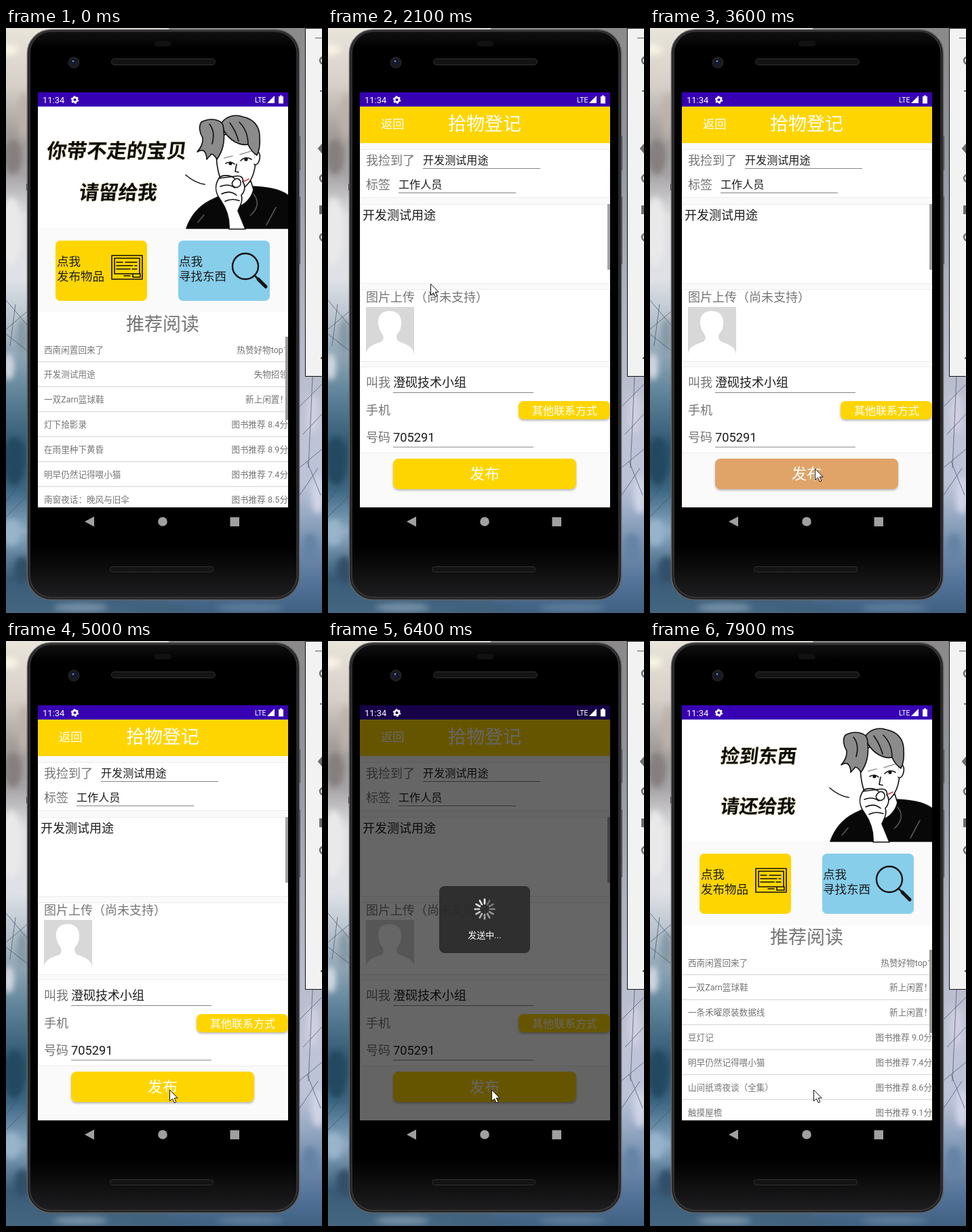
These frames come from a looping animation (466 by 864 pixels, 8 s). An HTML page:

```html
<!DOCTYPE html>
<html lang="zh-CN">
<head>
<meta charset="utf-8">
<style>
html, body { margin: 0; width: 100%; height: 100%; overflow: hidden; background: #111; }
svg { display: block; width: 466px; height: 864px; }
text { font-family: Roboto, "Noto Sans CJK SC", "Noto Sans CJK", sans-serif; white-space: pre; }
.brush { font-family: "Noto Sans CJK SC", "Noto Sans CJK", serif; font-weight: 500; }
.ink { font-weight: 900; stroke: #f0e8c4; stroke-width: 1.6px; paint-order: stroke; }
.line { fill: none; stroke: #101010; stroke-width: 1.6; stroke-linecap: round; stroke-linejoin: round; }
</style>
</head>
<body>
<svg viewBox="0 0 466 864">
  <defs>
    <linearGradient id="wallLeft" x2="0" y2="1">
      <stop offset="0" stop-color="#e9e4da"/><stop offset=".1" stop-color="#d6cfc8"/>
      <stop offset=".18" stop-color="#a39d9b"/><stop offset=".25" stop-color="#a6a3a6"/>
      <stop offset=".32" stop-color="#dedee0"/><stop offset=".43" stop-color="#dfe1e6"/>
      <stop offset=".52" stop-color="#a9b8c4"/><stop offset=".62" stop-color="#62869c"/>
      <stop offset=".72" stop-color="#2d5670"/><stop offset=".79" stop-color="#3d6884"/>
      <stop offset=".86" stop-color="#8ba9c2"/><stop offset=".94" stop-color="#3a5c78"/>
      <stop offset="1" stop-color="#456681"/>
    </linearGradient>
    <linearGradient id="wallRight" x2="0" y2="1">
      <stop offset="0" stop-color="#8b898a"/><stop offset=".2" stop-color="#91959c"/>
      <stop offset=".45" stop-color="#aeb3c0"/><stop offset=".68" stop-color="#bfc3d6"/>
      <stop offset=".78" stop-color="#bcc3d8"/><stop offset=".86" stop-color="#849bb8"/>
      <stop offset=".95" stop-color="#527298"/><stop offset="1" stop-color="#3f6080"/>
    </linearGradient>
    <linearGradient id="bezel" x2="0" y2="1">
      <stop offset="0" stop-color="#111"/><stop offset=".03" stop-color="#000"/>
      <stop offset=".91" stop-color="#000"/><stop offset="1" stop-color="#1e1e20"/>
    </linearGradient>
    <filter id="soft"><feGaussianBlur stdDeviation="4"/></filter>
    <filter id="shadow" x="-10%" y="-10%" width="120%" height="140%">
      <feDropShadow dx="0" dy="2" stdDeviation="1.5" flood-color="#666" flood-opacity=".45"/>
    </filter>
    <clipPath id="screenClip"><rect x="47" y="95" width="369" height="613"/></clipPath>
  </defs>

  <g id="wall"></g>
  <g id="phone"></g>
  <g clip-path="url(#screenClip)">
    <rect x="47" y="95" width="369" height="613" fill="#fafafa"/>
    <g id="home"></g>
    <g id="form"></g>
    <rect x="47" y="95" width="369" height="21" fill="#3700b3"/>
    <rect id="dim" x="47" y="95" width="369" height="613"/>
    <g id="status"></g>
    <g id="dialog"></g>
  </g>
  <path id="cursor" d="M0 0V16.5L4 13L6.8 19L9.4 17.8L6.7 12H11.7Z" fill="#fff" stroke="#111" stroke-width="1"/>
</svg>

<script>
const $ = id => document.getElementById(id);
const MUTED = '#757575', DARK = '#1c1c1c', YELLOW = '#ffd500', PRESSED = '#e0a468';

const rect = (x, y, w, h, fill, more = '') =>
  `<rect x="${x}" y="${y}" width="${w}" height="${h}" fill="${fill}" ${more}/>`;
const path = (d, fill = 'none', more = '') => `<path d="${d}" fill="${fill}" ${more}/>`;
const label = (x, y, size, fill, text, more = '') =>
  `<text x="${x}" y="${y}" font-size="${size}" fill="${fill}" ${more}>${text}</text>`;
const brush = (x, y, size, fill, text) => label(x, y, size, fill, text, 'class="brush"');
const ink = (x, y, size, text) =>
  `<g transform="translate(${x} ${y}) skewX(-7)">${label(0, 0, size, '#0c0c0c', text, 'class="brush ink"')}</g>`;
const range = (n, draw) => Array.from({ length: n }, (_, i) => draw(i)).join('');

function drawWall() {
  const blobs = [
    [4, 32, 14, 8, '#f8f3e4'], [26, 130, 8, 36, '#bdb2aa'], [10, 190, 14, 26, '#85807f'],
    [8, 300, 16, 50, '#e9e9ea'], [24, 455, 8, 26, '#8398a4'], [4, 500, 8, 20, '#d2d9e0'],
    [12, 640, 16, 36, '#23495f'], [8, 745, 14, 20, '#98b4cb'], [24, 800, 12, 20, '#304f69'],
    [452, 570, 10, 30, '#cfcfe0'], [460, 690, 10, 28, '#d0d4e6'], [448, 770, 12, 24, '#6583a6'],
    [110, 856, 40, 6, '#7893a8'], [230, 858, 50, 6, '#41617c'], [360, 856, 50, 6, '#5d7c9a']
  ].map(([x, y, rx, ry, c]) => `<ellipse cx="${x}" cy="${y}" rx="${rx}" ry="${ry}" fill="${c}"/>`).join('');
  const twigs = 'M0 402L32 440M0 445L32 418M0 452L32 477M14 408L6 470M0 700L32 655M0 722L32 690' +
    'M432 560L466 526M438 600L466 570M452 515L446 650M432 650L466 622M444 640L464 690M433 690L460 650';
  $('wall').innerHTML = rect(0, 0, 240, 864, 'url(#wallLeft)') + rect(240, 0, 226, 864, 'url(#wallRight)') +
    `<g filter="url(#soft)">${blobs}</g>` + path(twigs, 'none', 'stroke="#465366" stroke-width="1" opacity=".7"') +
    rect(441.5, .5, 30, 514, '#f2f2f2', 'stroke="#111"') +
    rect(456, 14, 10, 1.5, '#888') +
    [48, 222, 309].map(y => `<circle cx="468" cy="${y}" r="5" fill="none" stroke="#6e6e6e" stroke-width="2.5"/>`).join('') +
    path('M463 93H466M461 178L466 172V184Z', '#6e6e6e', 'stroke="#6e6e6e" stroke-width="2"') +
    rect(462, 262, 5, 13, '#6e6e6e') + rect(464, 486, 2, 3, '#6e6e6e');
}

function drawPhone() {
  const grille = (x, y, w, h) => rect(x, y, w, h, '#141415', `rx="${h / 2}" stroke="#303032"`);
  $('phone').innerHTML =
    rect(429, 160, 5, 50, '#39393b') + rect(429, 249, 5, 100, '#39393b') + rect(30, 230, 4, 10, '#39393b') +
    rect(31.5, 2.5, 401, 842, '#202022', 'rx="35" stroke="#626264" stroke-width="1.5"') +
    rect(35, 5, 394, 836, 'url(#bezel)', 'rx="32" stroke="#3a3a3c" stroke-width="1.5"') +
    rect(219, 19, 25, 8, '#111', 'rx="4"') + grille(155.5, 45.5, 153, 9) + grille(153.5, 795.5, 152, 8) +
    '<circle cx="100" cy="51" r="8" fill="#1b1b1f" stroke="#2b2b2f"/><circle cx="100" cy="50" r="4" fill="#101a36"/><circle cx="99" cy="49" r="1.3" fill="#8990a8"/>' +
    path('M116 729L130 721.5V736.5Z', '#a0a0a0') + '<circle cx="231" cy="729" r="6.8" fill="#a0a0a0"/>' +
    rect(330.5, 722.5, 13.5, 13.5, '#a0a0a0');
}

function portrait() {
  return `<g class="line">` +
    path('M266 296C273 276 285 262 305 253L328 242L363 234C382 235 404 237 417 248V296Z', '#080808') +
    path('M322 248L336 243L361 226L365 239C361 254 350 262 343 263Z', '#fff') +
    path('M312 164C309 184 309 202 316 222C322 235 334 241 344 240C357 234 366 220 368 199L366 164L340 147Z', '#fff') +
    path('M367 183C374 180 376 188 373 197C371 202 368 203 366 201', '#fff') +
    path('M321 151C323 168 319 183 311 194C309 190 306 187 303 186C301 189 298 191 296 194C296 188 294 183 291 181C288 180 285 181 282 183C288 176 291 169 290 162C285 154 284 145 288 139C299 133 311 134 318 140C325 130 338 127 349 131C364 134 373 144 374 158C375 171 374 181 370 188C364 184 360 179 357 172C345 174 330 167 321 151Z', '#8b8b8b') +
    path('M318 140C321 144 321 147 321 151M344 139C352 147 357 157 357 172M300 142C306 149 307 160 304 171M330 140C336 148 340 156 343 167') +
    path('M322 192L334 189M345 187L361 182', 'none', 'style="stroke:#999"') +
    path('M324 200C329 197 334 198 337 201M346 196C351 191 357 191 362 194M340 201L338 212L343 213') +
    '<circle cx="331" cy="200" r="1.8" fill="#101010"/><circle cx="354" cy="194" r="1.8" fill="#101010"/>' +
    path('M346 229L358 223', 'none', 'style="stroke:#c8404c"') +
    path('M329 297C330 280 325 267 317 255C308 243 307 233 314 222L337 219C346 217 351 221 349 227C354 233 352 242 347 247C350 257 344 264 342 270L353 297Z', '#fff') +
    path('M314 222C318 216 331 217 337 222M335 226C341 218 349 225 345 233C338 239 330 232 335 226ZM316 234C324 231 332 232 337 236M318 245C326 241 334 242 340 247M323 256C331 252 338 253 344 255') +
    path('M265 217C273 224 281 229 293 231') +
    path('M365 245C374 256 371 268 360 277M384 291L398 265M283 287L292 276', 'none', 'style="stroke:#555"') + '</g>';
}

function drawHome() {
  const board = `<g class="line">` +
    path('M156 336H201V371H156ZM160 340H197V363H160ZM163 346H172M176 346H193M163 351H187M190 351H193M163 356H183M186 356H193M174 366H183M187 363H198V368H187Z') + '</g>';
  const lens = '<circle cx="353" cy="352" r="19" fill="none" stroke="#111" stroke-width="2.4"/>' +
    path('M367 366L372 371', 'none', 'stroke="#111" stroke-width="2.5"') +
    path('M372 371L383 382', 'none', 'stroke="#111" stroke-width="5" stroke-linecap="round"');
  $('home').innerHTML = rect(47, 116, 369, 179, '#fff') + portrait() +
    `<g id="bannerA">${ink(59, 192, 29.5, '你带不走的宝贝') + ink(107, 253, 28.7, '请留给我')}</g>` +
    `<g id="bannerB">${ink(103, 180, 28, '捡到东西') + ink(103, 254, 27.7, '请还给我')}</g>` +
    rect(73, 314, 135, 89, YELLOW, 'id="postButton" rx="7"') + rect(254, 314, 135, 89, '#87ceeb', 'rx="7"') +
    board + lens +
    brush(75, 351, 17.5, DARK, '点我') + brush(75, 373, 17.5, DARK, '发布物品') +
    brush(255, 351, 17.5, DARK, '点我') + brush(255, 373, 17.5, DARK, '寻找东西') +
    rect(47, 420, 369, 288, '#fff') + brush(177, 447, 27, MUTED, '推荐阅读') +
    `<g id="listA">${list(listA)}</g><g id="listB">${list(listB)}</g>` +
    rect(412, 456, 4, 123, '#999');
}

const book = score => `图书推荐 ${score}分`;
const calmBook = ['明早仍然记得喂小猫', book('7.4')];
const shoes = ['一双Zarn篮球鞋', '新上闲置！'];
const news = ['西南闲置回来了', '热赞好物top1'];
const listA = [news, ['开发测试用途', '失物招领'], shoes, ['灯下拾影录', book('8.4')],
  ['在雨里种下黄昏', book('8.9')], calmBook, ['南窗夜话：晚风与旧伞', book('8.5')]];
const listB = [news, shoes, ['一条禾曜原装数据线', '新上闲置！'], ['豆灯记', book('9.0')],
  calmBook, ['山间纸鸢夜谈（全集）', book('8.6')], ['触摸屋檐', book('9.1')]];

function list(rows) {
  return rows.map(([title, note], i) => {
    const y = 479.5 + 36.9 * i;
    return label(56, y, 12.6, MUTED, title) + label(416, y, 12.6, MUTED, note, 'text-anchor="end"') +
      rect(47, y + 12.5, 369, 1.5, '#dedede');
  }).join('');
}

function drawForm() {
  const card = (y, h) => rect(47.5, y + .5, 368, h, '#fff', 'stroke="#ececec"');
  const underline = (x, y, w) => rect(x, y, w, 1, '#858585');
  $('form').innerHTML = rect(47, 116, 369, 592, '#fafafa') + rect(47, 116, 369, 54, YELLOW) +
    brush(78, 148, 17.3, '#fff', '返回') + brush(177, 151, 27, '#fff', '拾物登记') +
    card(179, 71) + card(260, 117) + card(386, 106) + card(500, 127) +
    label(56, 202, 18, MUTED, '我捡到了') + label(140, 201, 16.1, DARK, '开发测试用途') + underline(140, 207, 173) +
    label(56, 238, 18, MUTED, '标签') + label(104, 237, 16.1, DARK, '工作人员') + underline(104, 243, 173) +
    label(51, 283, 18, DARK, '开发测试用途') + rect(412, 260, 4, 97, '#a3a3a3') +
    label(56, 404, 18, MUTED, '图片上传（尚未支持）') +
    rect(56, 412, 71, 72, '#d8d8d8') +
    path('M56 484C56 470 67 468 79 463C83 460 82 455 80 452C76 447 75 442 74 437C73 424 80 418 91 418C102 418 109 425 108 437C108 443 106 448 102 452C100 456 101 461 105 463C116 468 127 470 127 484Z', '#fff') +
    label(56, 530, 18, MUTED, '叫我') + label(96, 530, 18, DARK, '澄砚技术小组') + underline(96, 538, 207) +
    label(56, 571, 18, MUTED, '手机') + label(56, 611, 18, MUTED, '号码') +
    label(96, 611, 18.3, DARK, '705291') + underline(96, 618.5, 207) +
    rect(281, 551, 135, 27, YELLOW, 'rx="7" filter="url(#shadow)"') + label(301, 571, 16, '#fff', '其他联系方式') +
    rect(96, 636, 270, 45, YELLOW, 'id="sendButton" rx="8" filter="url(#shadow)"') + brush(209, 666, 22, '#fff', '发布');
}

function drawOverlays() {
  $('status').innerHTML = label(54, 110.5, 13, '#fff', '11:34') + label(367, 109.5, 10.5, '#fff', 'LTE') +
    '<circle cx="101.5" cy="106" r="3.4" fill="none" stroke="#fff" stroke-width="2.6"/>' +
    '<circle cx="101.5" cy="106" r="4.9" fill="none" stroke="#fff" stroke-width="1.8" stroke-dasharray="2.6 2.53"/>' +
    path('M385 111H396V100Z', '#fff') + path('M402 101H404V99.5H407V101H409V111.5H402Z', '#fff');
  $('dialog').innerHTML = rect(164, 362, 134, 99, '#2b2b2b', 'rx="8" opacity=".92"') +
    range(12, i => `<line class="spoke" x1="231" x2="231" y1="381.5" y2="388" stroke="#f2f2f2" stroke-width="2.6" stroke-linecap="round" transform="rotate(${i * 30} 231 396)"/>`) +
    label(231, 439, 13, '#fff', '发送中...', 'text-anchor="middle"');
}

drawWall();
drawPhone();
drawHome();
drawForm();
drawOverlays();

const spokes = document.querySelectorAll('.spoke');
const show = (id, on) => $(id).style.display = on ? '' : 'none';
const between = (t, a, b) => t >= a && t < b;
const progress = (t, a, b) => Math.min(1, Math.max(0, (t - a) / (b - a)));
const ease = p => p * p * (3 - 2 * p);

// Pointer moves: start, end, target x and y
const moves = [[700, 1250, 151.5, 378], [2400, 3300, 243.5, 651], [3900, 4400, 241.5, 663]];
function pointerAt(t) {
  let x = 330, y = 870;
  for (const [start, end, tx, ty] of moves) {
    const p = ease(progress(t, start, end));
    x += (tx - x) * p;
    y += (ty - y) * p;
  }
  return [x, y];
}

function render(t) {
  const formOpen = between(t, 1600, 7700), sending = between(t, 5500, 7700);
  const refreshed = t >= 600, returned = t >= 7700;
  show('home', !formOpen);
  show('form', formOpen);
  show('listA', !refreshed);
  show('listB', refreshed);
  show('bannerA', !returned);
  show('bannerB', returned);
  $('postButton').setAttribute('fill', between(t, 1300, 1600) ? PRESSED : YELLOW);
  $('sendButton').setAttribute('fill', between(t, 3500, 3800) ? PRESSED : YELLOW);
  $('dim').setAttribute('opacity', sending ? .6 * progress(t, 5500, 5785) : 0);
  show('dialog', sending);
  const head = Math.floor(t / 50);
  spokes.forEach((spoke, i) => spoke.setAttribute('opacity', .3 + .7 * ((i - head % 12 + 19) % 12) / 11));
  $('cursor').setAttribute('transform', `translate(${pointerAt(t)})`);
}

function tick() {
  render(performance.now() % 8000);
  requestAnimationFrame(tick);
}
tick();
</script>
</body>
</html>
```
